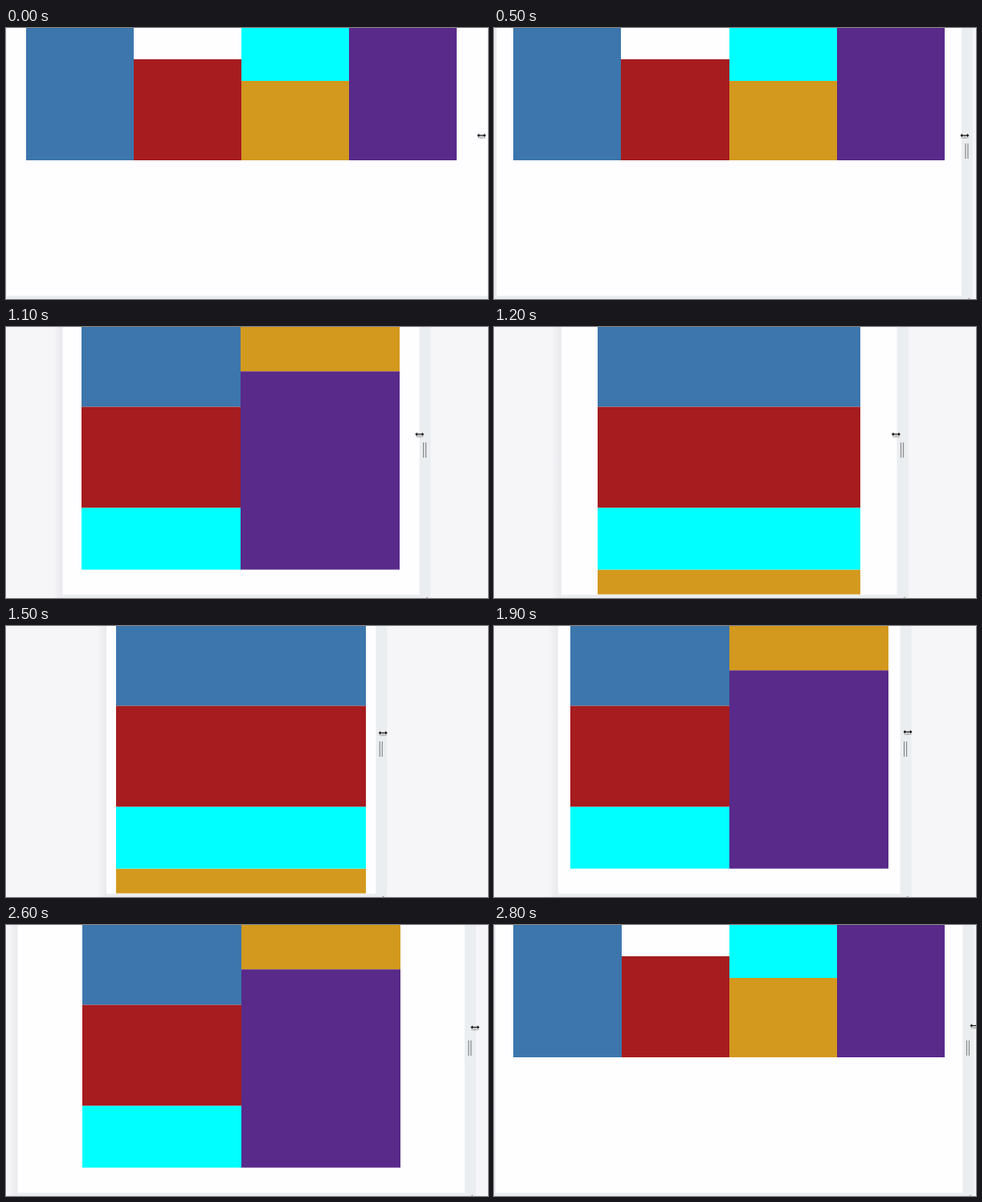
Recreate the animation shown at these times as an HTML page. Size 600 by 338 pixels, loop 2900 ms.

```html
<!DOCTYPE html>
<html lang="en">
<head>
<meta charset="utf-8">
<title>Responsive columns</title>
<style>
html, body { margin: 0; width: 100%; height: 100%; overflow: hidden; background: #f6f5f8; }
svg { display: block; width: 600px; height: 338px; }
</style>
</head>
<body>
<svg viewBox="0 0 600 338">
  <defs>
    <linearGradient id="shade">
      <stop offset="0" stop-color="#e9e8ec" stop-opacity="0"/>
      <stop offset="1" stop-color="#e9e8ec"/>
    </linearGradient>
    <clipPath id="view"><rect width="600" height="333.6"/></clipPath>
  </defs>
  <rect width="600" height="338" fill="#f6f5f8"/>
  <rect id="shadow" width="12" height="338" fill="url(#shade)"/>
  <rect id="frame" height="338" fill="#ebeef0"/>
  <rect id="page" height="334" fill="#fefdff"/>
  <g id="blocks" clip-path="url(#view)"></g>
  <g id="handle">
    <path d="M5 144V163M8 144V163" stroke="#87898b" stroke-width="1.2"/>
    <path d="M8 338L10 336.6V338Z" fill="#77797b"/>
  </g>
  <g id="cursor">
    <ellipse cy="2.4" rx="5" ry="1.5" fill="#777" opacity=".45"/>
    <path d="M-6 0L-2.6 -3V-1H2.6V-3L6 0L2.6 3V1H-2.6V3Z" fill="#111" stroke="#fff" stroke-width=".7"/>
  </g>
</svg>
<script>
const LOOP = 2900, STEP = 100, START = 500, TURN = 1500;
const SCALE = 0.5477, PAD = 22;

const BLOCKS = {
  blue: { fill: '#3c76ac', height: 200 },
  red: { fill: '#a61c1f', height: 126 },
  cyan: { fill: '#00ffff', height: 77.2 },
  gold: { fill: '#d3991e', height: 99 },
  plum: { fill: '#592a8a', height: 247.4 }
};

// widest first; blocks in a column stack upwards from the base line
const LAYOUTS = [
  { min: 1024, base: 165, cols: [['blue'], ['red'], ['cyan', 'gold'], ['plum']] },
  { min: 768, base: 302.6, cols: [['blue', 'red', 'cyan'], ['gold', 'plum']] },
  { min: 0, base: 649, cols: [['blue', 'red', 'cyan', 'gold', 'plum']] }
];

const el = id => document.getElementById(id);
const set = (id, attrs) => {
  for (const k in attrs) el(id).setAttribute(k, attrs[k]);
};

// the pointer drags the edge inwards until TURN, then back out
function pose(t) {
  if (t < START) return { left: 0.7, right: 599.5, x: 592, y: 134, mid: 293 };
  const inward = t < TURN;
  const u = inward ? (t - 450) / 1050 : (2850 - t) / 1350;
  const left = 125 * u ** (inward ? 1.19 : 1.28);
  const right = 585.3 - left;
  const lead = inward ? -3 - 10 * u ** 2 : 2 + 6 * (1 - u) ** 2;
  const sway = inward ? 100 * u ** 2 * (1 - u) ** 4 : 0;
  const y = 134 - 8.5 * ((t - START) / 2300) ** 3;
  return { left, right, x: right + 7 + lead, y, mid: 292.8 - sway };
}

function column(names, x, width, base) {
  return [...names].reverse().map(name => {
    const { fill, height } = BLOCKS[name];
    base -= height;
    return `<rect x="${x}" y="${base}" width="${width}" height="${height}" fill="${fill}"/>`;
  }).join('');
}

function blocks(pageWidth, mid) {
  const px = pageWidth / SCALE;
  const { min, base, cols } = LAYOUTS.find(l => px >= l.min);
  const size = ((min || Math.min(px, 640)) - 2 * PAD) * SCALE;
  const edge = i => Math.round(mid - size / 2 + size * i / cols.length);
  return cols.map((names, i) => column(names, edge(i), edge(i + 1) - edge(i), base)).join('');
}

function draw(t) {
  const { left, right, x, y, mid } = pose(t);
  set('shadow', { x: left - 12 });
  set('frame', { x: left, width: right - left + 14 });
  set('page', { x: left, width: right - left });
  set('handle', { transform: `translate(${right} 0)` });
  set('cursor', { transform: `translate(${x} ${y})` });
  el('blocks').innerHTML = blocks(right - left, mid);
}

let last = -1;
const origin = performance.now();
function tick() {
  const t = Math.floor((performance.now() - origin) % LOOP / STEP) * STEP;
  if (t !== last) draw(last = t);
  requestAnimationFrame(tick);
}
tick();
</script>
</body>
</html>
```
